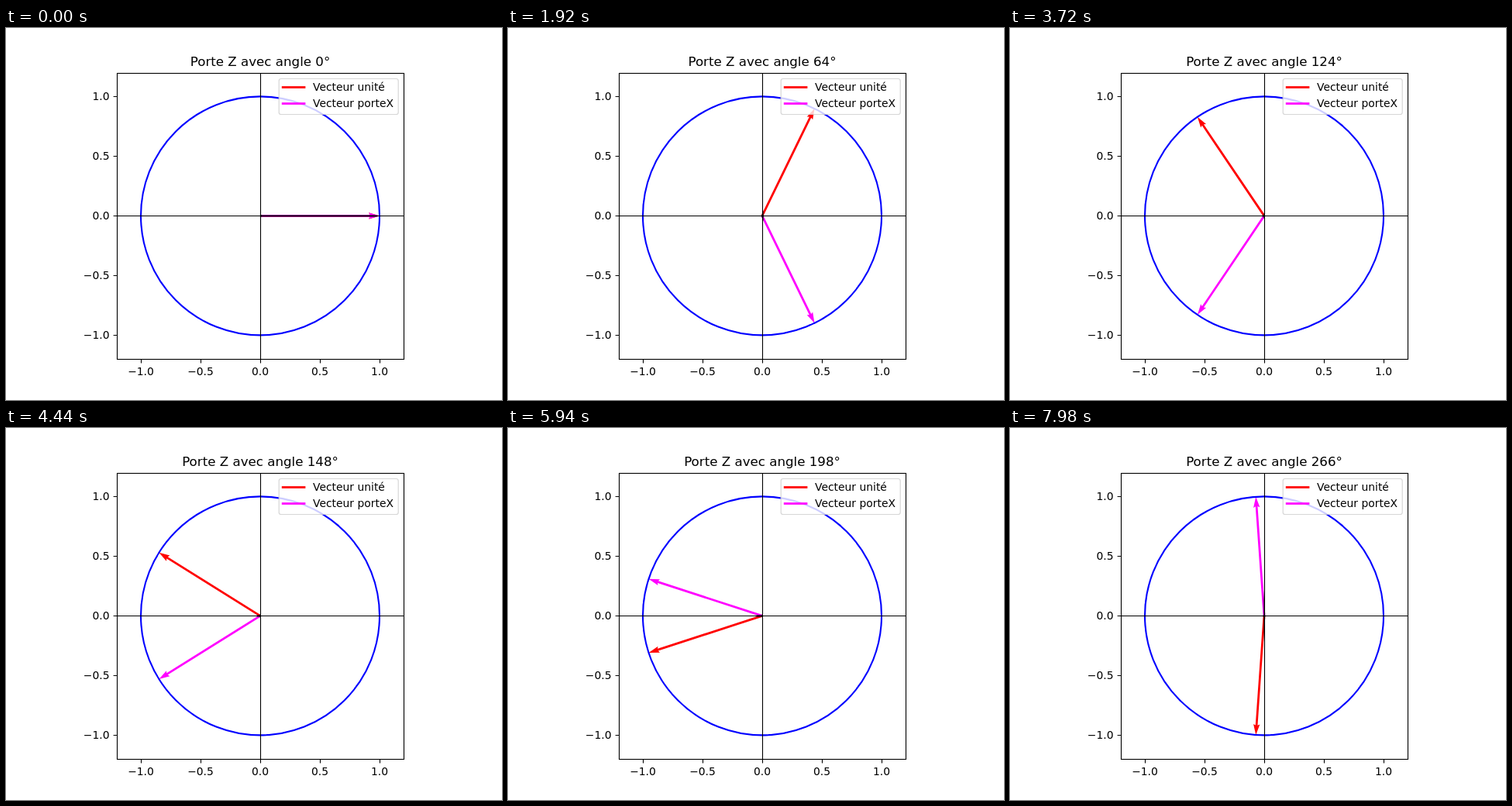
Write an HTML page that moves like this. It is 640 px wide and 480 px high and loops after 8 s.

```html
<!DOCTYPE html>
<html lang="fr">
<head>
<meta charset="utf-8">
<style>
  html, body { margin: 0; width: 100%; height: 100%; overflow: hidden; background: #fff; }
  svg { display: block; font: 13.89px "DejaVu Sans", sans-serif; }
  .line { fill: none; stroke: #000; stroke-width: 1.11; }
</style>
</head>
<body>
<svg id="stage" width="640" height="480" viewBox="0 0 640 480">
  <clipPath id="arrows"><path class="unit"/><path class="gate"/></clipPath>
  <path class="unit" fill="#f00"/>
  <path class="gate" fill="#f0f"/>
  <circle cx="328" cy="242.4" r="154" fill="none" stroke="#00f" stroke-width="2.08"/>
  <path class="line" d="M143.5 242.5H513.5M328.5 58.5V427.5"/>
  <!-- the axes look heavier where they cross an arrow -->
  <path class="line" d="M143.5 242.5H513.5M328.5 58.5V427.5" style="stroke-width:2.1" clip-path="url(#arrows)"/>
  <rect class="line" x="143.5" y="58.5" width="370" height="369"/>
  <g id="ticks"></g>
  <text id="title" x="328" y="49" font-size="16.67" text-anchor="middle"></text>
  <rect x="352.2" y="65.5" width="154" height="46" rx="2.8" fill="#fff" fill-opacity=".8"
        stroke="#ccc" stroke-opacity=".8" stroke-width="1.2"/>
  <path d="M357.2 76.5h27.8" stroke="#f00" stroke-width="2.78" stroke-linecap="square"/>
  <path d="M357.2 97.5h27.8" stroke="#f0f" stroke-width="2.78" stroke-linecap="square"/>
  <text x="396" y="81">Vecteur unité</text>
  <text x="396" y="102">Vecteur porteX</text>
</svg>
<script>
const CX = 328, CY = 242.4, RADIUS = 154, SHAFT = 2.772;
const LOOP = 8000, STEP = 30;

const ticks = document.getElementById('ticks');
for (let value = -1; value <= 1; value += 0.5) {
  const x = CX + value * RADIUS + 0.5;
  const y = Math.round(CY - value * RADIUS) + 0.5;
  const label = value.toFixed(1).replace('-', '\u2212');
  ticks.innerHTML += `
    <path class="line" d="M${x} 427.5v4.9M143.5 ${y}h-4.9"/>
    <text x="${x - 0.5}" y="448" text-anchor="middle">${label}</text>
    <text x="133.5" y="${y + 4.8}" text-anchor="end">${label}</text>`;
}

// Arrow outline along the x axis, in multiples of the shaft width
const tip = RADIUS / SHAFT;
const outline = [
  [0, -0.5], [tip - 4.5, -0.5], [tip - 5, -1.5], [tip, 0],
  [tip - 5, 1.5], [tip - 4.5, 0.5], [0, 0.5]
];

function setArrow(name, degrees) {
  const angle = degrees * Math.PI / 180;
  const c = Math.cos(angle) * SHAFT, s = Math.sin(angle) * SHAFT;
  const points = outline.map(([u, v]) =>
    `${(CX + u * c - v * s).toFixed(2)} ${(CY - u * s - v * c).toFixed(2)}`);
  for (const path of document.querySelectorAll('.' + name))
    path.setAttribute('d', `M${points.join('L')}Z`);
}

const title = document.getElementById('title');
const start = performance.now();

function draw(now) {
  const degrees = Math.floor(Math.max(0, now - start) % LOOP / STEP);
  setArrow('unit', degrees);
  setArrow('gate', -degrees);
  title.textContent = `Porte Z avec angle ${degrees}°`;
  requestAnimationFrame(draw);
}
draw(start);
</script>
</body>
</html>
```
